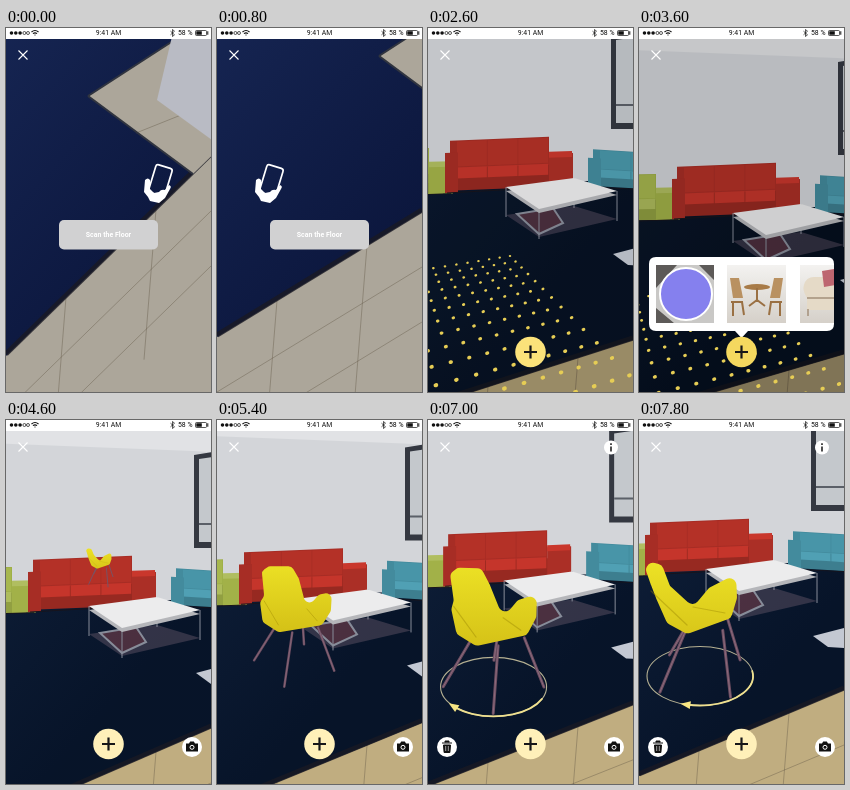
Write an HTML page with a canvas that moves like this. It is 205x364 px and loops after 8000 ms.

```html
<!DOCTYPE html>
<html lang="en">
<head>
<meta charset="utf-8">
<title>Furniture preview</title>
<style>
html, body { margin: 0; width: 100%; height: 100%; overflow: hidden; background: #fff; }
canvas, svg { position: absolute; inset: 0; width: 100%; height: 100%; display: block; }
text { font-family: Roboto, "Liberation Sans", sans-serif; }
</style>
</head>
<body>
<canvas id="scene"></canvas>
<svg viewBox="0 0 205 364" preserveAspectRatio="none">
  <defs>
    <clipPath id="strip"><rect x="17" y="237" width="178" height="58"/></clipPath>
    <linearGradient id="photo" x2="0" y2="1"><stop stop-color="#f3f2f0"/><stop offset="1" stop-color="#d5d0c9"/></linearGradient>
    <g id="seat" fill="#b99161" stroke="#9a7043" stroke-width="2">
      <path d="M3 13h9l4 20H6z" stroke="none"/>
      <path d="M4 37h12M6 37v14M15 37l2 13" fill="none"/>
    </g>
  </defs>

  <g id="scan">
    <g id="phone">
      <rect x="146" y="138" width="17" height="29" rx="2.5" fill="none" stroke="#fff" stroke-width="1.7" transform="rotate(17 154.5 152)"/>
      <path d="M139 152q3-3 5 0v9l4 4 5-1q2-3 6-2l4-5q3 1 1 4l-5 9-6 5-9-2-2-4-4-5z" fill="#fff"/>
    </g>
    <rect x="53" y="192" width="99" height="29.5" rx="5" fill="#d1d1d2"/>
    <text x="102.5" y="209" font-size="7" font-weight="700" fill="#fff" text-anchor="middle">Scan the Floor</text>
  </g>

  <g id="picker">
    <path d="M17 229H188q7 0 7 7V296q0 7-7 7H109L102.500 310 96 303H17q-7 0-7-7V236q0-7 7-7z" fill="#fff"/>
    <g clip-path="url(#strip)"><g id="items">
      <g transform="translate(17 237)">
        <rect width="58" height="58" fill="#c9c8c6"/>
        <path d="M0 0H21L0 23zM43 0H58V15zM0 43L18 58H0z" fill="#5d5a58"/>
        <circle cx="30" cy="29" r="26" fill="#8580ee" stroke="#fff" stroke-width="2"/>
      </g>
      <g transform="translate(88 237)">
        <rect width="59" height="58" fill="url(#photo)"/>
        <use href="#seat"/><use href="#seat" transform="translate(59 0) scale(-1 1)"/>
        <ellipse cx="30" cy="22" rx="13" ry="3" fill="#a87b48"/>
        <path d="M30 23V37M22 41l8-6 8 6" fill="none" stroke="#9a7043" stroke-width="2"/>
      </g>
      <g transform="translate(161 237)">
        <rect width="58" height="58" fill="url(#photo)"/>
        <path d="M4 20q2-8 10-8h44v33H7V33q-5-8-3-13z" fill="#e5dac7"/>
        <path d="M7 33H58M8 44v7" stroke="#a4907b" stroke-width="1.5"/>
        <path d="M22 6l12-2 2 16-12 2z" fill="#bd6670"/>
      </g>
      <g transform="translate(233 237)">
        <rect width="58" height="58" fill="#f1f1f0"/>
        <path d="M17 10h14l4 19 12-3-2 11-22 3-9-10z" fill="#eddc22"/>
        <path d="M22 39l-4 14M40 37l5 16" stroke="#6b4a5a" stroke-width="1.5"/>
      </g>
    </g></g>
  </g>

  <path d="M12.500 22.500l9 9M21.500 22.500l-9 9" stroke="#fff" stroke-width="1.1"/>
  <g id="add">
    <circle id="disc" cx="102.500" cy="324" r="15.300"/>
    <path d="M96 324h13M102.500 317.500v13" stroke="#171719" stroke-width="2.200"/>
  </g>
  <g id="camera" transform="translate(186 327)">
    <circle r="10" fill="#fff"/>
    <path d="M-6-3.500h3l1.200-2h3.600l1.200 2h3v8h-12z" fill="#111"/>
    <circle cy=".3" r="2" fill="#111" stroke="#fff"/>
  </g>
  <g id="edit">
    <g transform="translate(19 327)">
      <circle r="10" fill="#fff"/>
      <path d="M-5-4h10M-2-4.500v-1.500h4v1.500M-3.500-2h7l-.6 7.500h-5.800z" fill="#111" stroke="#111"/>
      <path d="M-1.300-1v5M1.300-1v5" stroke="#fff" stroke-width=".6"/>
    </g>
    <circle cx="183" cy="27.500" r="7" fill="#fff"/>
    <path d="M183 26.500v5M183 23.300v1.600" stroke="#222" stroke-width="1.600"/>
  </g>

  <rect width="205" height="11" fill="#fff"/>
  <g fill="none" stroke="#111" stroke-width=".7">
    <path d="M5.500 5h8.700" stroke-width="3.600" stroke-linecap="round" stroke-dasharray="0 4.300"/>
    <circle cx="18.400" cy="5" r="1.500"/><circle cx="22" cy="5" r="1.500"/>
    <path d="M25.500 4q3.500-3 7 0M27 5.600q2-1.600 4 0M28.500 7h1" stroke-width="1.200"/>
    <path d="M164.500 3.200l4 3.600-2 1.700v-7l2 1.700-4 3.600"/>
    <rect x="189.500" y="2.500" width="11" height="5" rx="1"/>
    <path d="M190.300 5h5.500M201.300 5h1" stroke-width="3.400"/>
  </g>
  <g fill="#111" font-size="6.900">
    <text x="102.500" y="7.400" text-anchor="middle">9:41 AM</text>
    <text x="172" y="7.400">58 %</text>
  </g>
</svg>
<script>
const LOOP = 8000, STEP = 200, W = 205, H = 364;
const $ = id => document.getElementById(id);
const canvas = $('scene'), c = canvas.getContext('2d');
const mix = (a, b, k) => a + (b - a) * k;
const blend = (a, b, k) => a.map((v, i) => mix(v, b[i], k));
const rgb = v => `rgb(${v.map(Math.round)})`;
const ramp = (t, from, to) => Math.min(1, Math.max(0, (t - from) / (to - from)));

// Time, room x, y and scale, carpet edge at left and right, light
const SHOTS = [
  [0, 80, -400, 1.3, 328, 128, 1],
  [1600, 19, -241, 1.3, 290, 240, 1],
  [2600, -5, -27, 1, 378, 312, .93],
  [3600, 11, -1, 1, 386, 326, .88],
  [4600, 0, 0, 1, 397, 308, 1],
  [6400, 0, -17, 1, 374, 296, 1],
  [7800, -16, -37, 1, 356, 270, 1]];

function shotAt(t) {
  let i = 0;
  while (i < SHOTS.length - 2 && t >= SHOTS[i + 1][0]) i++;
  const [a, b] = [SHOTS[i], SHOTS[i + 1]];
  const [, x, y, scale, left, right, light] = blend(a, b, ramp(t, a[0], b[0]));
  return { x, y, scale, left, right, light };
}

function poly(points, fill) {
  c.beginPath();
  for (const [x, y] of points) c.lineTo(x, y);
  c.closePath();
  c.fillStyle = fill;
  c.fill();
}
function rect(x, y, w, h, fill) {
  c.fillStyle = fill;
  c.fillRect(x, y, w, h);
}
function line(x0, y0, x1, y1, color, width) {
  c.strokeStyle = color;
  c.lineWidth = width;
  c.beginPath();
  c.moveTo(x0, y0);
  c.lineTo(x1, y1);
  c.stroke();
}
function gradient(x, y, from, to) {
  const g = c.createLinearGradient(0, 0, x, y);
  g.addColorStop(0, from);
  g.addColorStop(1, to);
  return g;
}
function placed(draw, ...matrix) {
  c.save();
  c.transform(...matrix);
  draw();
  c.restore();
}

function drawFloor(t, shot) {
  const { left, right, light } = shot, indoors = ramp(t, 1600, 2600);
  const slope = (right - left) / W;
  const tile = rgb(blend([172, 166, 154], [192, 173, 128], indoors));
  const seam = 'rgba(95,85,68,.4)';
  rect(0, 0, W, H, tile);
  for (let i = 1; i < 3; i++) {
    line(0, left + i * 55, W, right + i * 55, seam, 1);
    const x = 240 - i * 90;
    line(x, left + slope * x, x - 12, left + slope * x + 150, seam, 1);
  }
  const carpet = [[0, 0], [W, 0], [W, right], [0, left]];
  poly(carpet, rgb(blend([14, 27, 70], [8, 23, 45], indoors)));
  poly(carpet, gradient(W, H / 2, 'rgba(60,85,140,.17)', 'rgba(0,0,15,.15)'));
  line(0, left - 2, W, right - 2, 'rgba(25,25,35,.8)', 5);

  if (t < 1600) placed(() => {
    poly([[170, 11], [82, 68], [187, 146], [400, -60]], tile);
    line(130, 105, W, 75, seam, 1);
    line(170, 11, 82, 68, '#30343f', 2);
    line(82, 68, 187, 146, '#30343f', 2);
    poly([[168, 0], [300, 0], [300, 180], [151, 72]], '#b9bbc4');
  }, 1, 0, 0, 1, t / 10, -t / 20);
  rect(0, 0, W, H, `rgba(0,0,0,${2 * (1 - light)})`);
}

function sofa(x, y, w, h, slope, hue, sat, lum) {
  const tone = d => `hsl(${hue},${sat}%,${lum + d}%)`;
  const seat = (w - 36) / 3;
  placed(() => {
    rect(5, 0, w - 29, 30, tone(-3));
    rect(10, 28, w - 20, 22, tone(-7));
    for (let i = 0; i < 3; i++) {
      const left = 12 + i * seat;
      rect(left, 1, seat - .8, 25, tone(0));
      rect(left, 27, seat - .8, 11, tone(4));
    }
    rect(0, 12, 13, 40, tone(-3));
    rect(w - 24, 17, 24, 33, tone(-2));
    rect(w - 24, 15, 23, 6, tone(5));
    line(2, 52, w - 2, 50, '#17141c', 1);
  }, 1, slope, 0, h / 52, x, y);
}

function drawTable() {
  const top = [[83, 186], [151, 177], [194, 190], [116, 208]];
  const lower = dy => top.map(([x, y]) => [x, y + dy]);
  const steel = '#878c99';
  poly(lower(28), 'rgba(95,82,100,.5)');
  poly([[94, 213], [130, 207], [140, 222], [116, 233]], 'rgba(120,40,50,.35)');
  c.strokeStyle = steel;
  c.stroke();
  lower(28).forEach(([x, y]) => line(x, y - 28, x, y + 2, steel, 1));
  poly(lower(4), '#b5b6ba');
  poly(top, '#ececed');
}

function drawRoom({ x, y, scale }) {
  placed(() => {
    rect(-300, -300, 800, 480, '#d3d5d9');
    poly([[-300, -300], [400, -300], [400, 46], [187, 31], [-300, 12]], 'rgba(255,255,255,.3)');
    poly([[188, 35], [300, 17], [300, 128], [188, 128]], '#343841');
    poly([[193, 39], [300, 24], [300, 122], [193, 122]], '#c4c8cc');
    line(193, 104, 300, 104, '#5b6068', 2);
    sofa(-100, 149, 130, 48, -.02, 69, 42, 51);
    sofa(22, 140, 128, 52, -.04, 4, 64, 43);
    sofa(165, 148, 130, 38, .06, 192, 40, 47);
    poly([[190, 253], [240, 240], [240, 266], [205, 264]], '#c3c8d2');
    drawTable();
  }, scale, 0, 0, scale, x, y);
}

// Perspective map of the unit square onto four corners
function projection([[x0, y0], [x1, y1], [x2, y2], [x3, y3]]) {
  const sx = x0 - x1 + x2 - x3, sy = y0 - y1 + y2 - y3;
  const ax = x1 - x2, ay = y1 - y2, bx = x3 - x2, by = y3 - y2;
  const den = ax * by - bx * ay;
  const g = (sx * by - sy * bx) / den, h = (ax * sy - ay * sx) / den;
  return (u, v) => {
    const w = g * u + h * v + 1;
    const project = (p0, p1, p3) => ((p1 - p0 + g * p1) * u + (p3 - p0 + h * p3) * v + p0) / w;
    return { x: project(x0, x1, x3), y: project(y0, y1, y3), w };
  };
}

const GRID_NEAR = [[145, 95], [4, 121], [29, 277], [235, 212]];
const GRID_FAR = [[82, 228], [-31, 246], [-10, 385], [184, 330]];

function drawGrid(t, shot) {
  const k = ramp(t, 1600, 2600), late = t > 2600;
  const dx = late ? shot.x + 5 : 0, dy = late ? shot.y + 27 : 0;
  const map = projection(GRID_NEAR.map((p, i) => blend(p, GRID_FAR[i], k)));
  c.fillStyle = rgb(blend([205, 181, 90], [230, 205, 85], k));
  for (let i = 0; i <= 16; i++) for (let j = 0; j <= 17; j++) {
    const { x, y, w } = map(i / 10, j / 11);
    if (w < .15) continue;
    const r = Math.min(3, mix(1.7, 1.25, k) / w);
    c.beginPath();
    c.ellipse(x + dx, y + dy, r, r * .85, -.3, 0, 7);
    c.fill();
  }
}

// Matching outlines of the shell before and after the turn
const SHELL_FRONT = [[34, 158], [43, 152], [76, 151], [85, 164], [91, 206], [105, 189], [118, 189],
  [116, 212], [104, 228], [48, 235], [29, 222], [28, 198], [36, 192]];
const SHELL_SIDE = [[6, 148], [12, 142], [23, 145], [31, 166], [54, 187], [70, 168], [97, 154],
  [98, 178], [92, 198], [48, 214], [28, 203], [17, 178], [12, 165]];
const RING = { rx: 53, ry: 29.5 };

function drawRing(x, y, end) {
  const arc = (from, to, color, width) => {
    c.beginPath();
    c.ellipse(x, y, RING.rx, RING.ry, 0, from, to);
    c.strokeStyle = color;
    c.lineWidth = width;
    c.stroke();
  };
  arc(0, 7, '#b5b092', 1.1);
  arc(end - 2, end, '#efe08f', 1.8);
  const angle = Math.atan2(RING.ry * Math.cos(end), -RING.rx * Math.sin(end)) + (end > Math.PI / 2 ? 0 : Math.PI);
  placed(() => poly([[6, 0], [-4, -4], [-4, 4]], '#f7e684'),
    Math.cos(angle), Math.sin(angle), -Math.sin(angle), Math.cos(angle),
    x + RING.rx * Math.cos(end), y + RING.ry * Math.sin(end));
}

function drawShell(p) {
  const [last, first] = [p[p.length - 1], p[0]];
  c.beginPath();
  c.moveTo((last[0] + first[0]) / 2, (last[1] + first[1]) / 2);
  p.forEach((q, i) => c.arcTo(...q, ...p[(i + 1) % p.length], 7));
  c.closePath();
  const g = c.createLinearGradient(0, 145, 0, 234);
  g.addColorStop(0, '#ece125');
  g.addColorStop(1, '#d3bf16');
  c.fillStyle = g;
  c.fill();
  const crease = 'rgba(150,130,0,.4)';
  line(p[4][0], p[4][1], p[8][0] - 6, p[8][1] - 5, crease, 1.2);
  line(p[12][0], p[12][1] + 6, p[9][0], p[9][1] - 9, crease, 1.2);
}

function drawChair(t) {
  const landed = ramp(t, 4800, 5600), spin = ramp(t, 6400, 7800);
  const turn = landed < 1 ? .9 * (1 - landed) : spin;
  const size = mix(.28, 1, landed);
  const [px, py] = blend([93, 139], blend([75, 192], [53, 180], spin), landed);
  const [cx, cy] = blend([75, 192], [53, 180], turn);
  const [fx, fy] = blend([69, 275], [61, 256], turn);
  const [sx, sy] = blend([72, 228], [68, 204], turn);
  placed(() => {
    c.lineCap = 'round';
    if (landed === 1) drawRing(fx, fy, mix(2.86, 1.83, turn));
    for (let i = 0; i < 4; i++) {
      const a = .5 + i * Math.PI / 2 - 1.15 * turn;
      const leg = [sx + 26 * Math.cos(a), sy + 8 * Math.sin(a),
        fx + RING.rx * .95 * Math.cos(a), fy + RING.ry * .9 * Math.sin(a)];
      line(...leg, '#6c4d60', 3);
      line(...leg, '#927285', .8);
    }
    drawShell(SHELL_FRONT.map((p, i) => blend(p, SHELL_SIDE[i], turn)));
  }, size, 0, 0, size, px - cx * size, py - cy * size);
}

const show = (id, on) => $(id).setAttribute('visibility', on ? 'visible' : 'hidden');
const transform = (id, value) => $(id).setAttribute('transform', value);

function drawControls(t) {
  const picking = t >= 3000 && t < 4200;
  show('scan', t < 1000);
  transform('phone', `translate(${50 * Math.cos(t * Math.PI / 800) - 50})`);
  show('add', t >= 1000);
  $('disc').setAttribute('fill', t >= 4200 ? '#fff0b9' : picking ? '#f4d85f' : '#fbe27a');
  show('picker', picking);
  transform('picker', `translate(102.5 310) scale(${ramp(t, 2800, 3200)}) translate(-102.5 -310)`);
  transform('items', `translate(${-110 * ramp(t, 3600, 4000)})`);
  show('camera', t >= 4200);
  show('edit', t >= 5600);
}

function render(t) {
  const dpr = devicePixelRatio || 1;
  const w = Math.round(innerWidth * dpr), h = Math.round(innerHeight * dpr);
  if (canvas.width !== w || canvas.height !== h) [canvas.width, canvas.height] = [w, h];
  c.setTransform(w / W, 0, 0, h / H, 0, 0);
  const shot = shotAt(t);
  drawFloor(t, shot);
  drawRoom(shot);
  rect(0, 0, W, H, `rgba(0,0,0,${1 - shot.light})`);
  if (t >= 1000 && t < 4200) drawGrid(t, shot);
  if (t >= 4200) drawChair(t);
  drawControls(t);
}

const start = performance.now();
function frame() {
  const t = (performance.now() - start) % LOOP;
  render(Math.floor(t / STEP) * STEP);
  requestAnimationFrame(frame);
}
frame();
</script>
</body>
</html>
```
